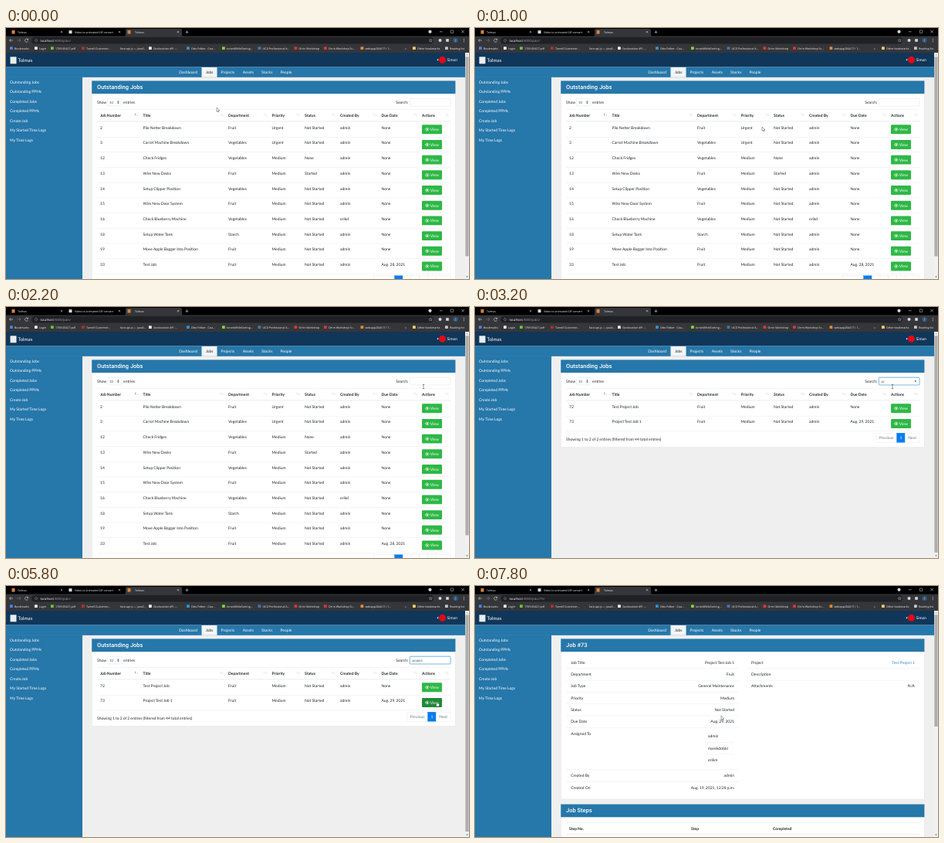
Recreate the animation shown at these times as an HTML page. Size 600 px wide and 325 px high, loop 8000 ms.

```html
<!DOCTYPE html>
<html lang="en">
<head>
<meta charset="utf-8">
<title>Job list</title>
<style>
html, body { margin: 0; width: 100%; height: 100%; overflow: hidden; background: #efefef; }
svg { display: block; width: 600px; height: 325px; text-rendering: geometricPrecision; }
text { font: 5px Lato, sans-serif; fill: #212529; white-space: pre; word-spacing: -.15px; }
.b { font-weight: 700; }
.w { fill: #fff; }
.h { font: 500 7.5px Roboto, sans-serif; fill: #fff; word-spacing: 0; }
.ui { font: 3.6px "Open Sans", sans-serif; fill: #f4f5f6; }
.url { font: 4.2px "Open Sans", sans-serif; fill: #9aa0a6; }
.in { font-size: 4.375px; fill: #495057; }
.m { fill: #6c757d; }
.a { fill: #2f86cc; }
.s { font: 4.4px "DejaVu Sans", sans-serif; fill: #d3d5d7; }
.s.on { fill: #666; }
</style>
</head>
<body>
<svg id="stage" viewBox="0 0 600 325" xmlns="http://www.w3.org/2000/svg"></svg>
<script>
const LOOP = 8000, STEP = 200, MAX_SCROLL = 27;
const BLUE = '#2677aa', LINE = '#dee2e6', ROW = 19.69, TOP = 121.3;

const rect = (x, y, w, h, fill, extra = '') =>
  `<rect x="${x}" y="${y}" width="${w}" height="${h}" fill="${fill}" ${extra}/>`;
const dot = (x, y, r, fill) => `<circle cx="${x}" cy="${y}" r="${r}" fill="${fill}"/>`;
const path = (d, stroke = '#d5d7da', w = .6, fill = 'none') =>
  `<path d="${d}" stroke="${stroke}" stroke-width="${w}" fill="${fill}"/>`;
const rule = (x, y, w, h = .35) => rect(x, y, w, h, LINE);
// y is the middle of the capitals
const text = (x, y, s, cls = '', anchor = 'start') =>
  `<text x="${x}" y="${y + 1.75}" class="${cls}" text-anchor="${anchor}">${s}</text>`;

const COLS = [122, 177.5, 288, 344.5, 387, 433, 486.5, 539, 579.75];
const HEADS = 'Job Number|Title|Department|Priority|Status|Created By|Due Date|Actions'.split('|');
const JOBS = `2|Pilo Netter Breakdown|Fruit|Urgent|Not Started|admin|None
3|Carrot Machine Breakdown|Vegetables|Urgent|Not Started|admin|None
12|Check Fridges|Vegetables|Medium|None|admin|None
13|Wire New Desks|Fruit|Medium|Started|admin|None
14|Setup Clipper Position|Vegetables|Medium|Not Started|admin|None
15|Wire New Door System|Fruit|Medium|Not Started|admin|None
16|Check Blueberry Machine|Vegetables|Medium|Not Started|erikd|None
18|Setup Water Tank|Starch|Medium|Not Started|admin|None
19|Move Apple Bagger Into Position|Fruit|Medium|Not Started|admin|None
33|Test Job|Fruit|Medium|Not Started|admin|Aug. 28, 2021
72|Test Project Job|Fruit|Medium|Not Started|admin|None
73|Project Test Job 1|Fruit|Medium|Not Started|admin|Aug. 29, 2021`
  .split('\n').map(r => r.split('|'));

// time, x, y, kind
const POINTER = [
  [0, 273, 103, 'arrow'], [1000, 372, 128, 'arrow'], [1200, 444.8, 148.5, 'arrow'],
  [1800, 505, 125, 'arrow'], [2200, 541, 103, 'beam'], [4600, 545, 118, 'arrow'],
  [4800, 552, 135, 'arrow'], [5000, 558.5, 150, 'hand'], [6000, 558.5, 150, 'arrow'],
  [6600, 530, 149, 'arrow'], [6800, 465, 148, 'arrow'], [7000, 405, 150, 'arrow'],
  [7200, 355, 153, 'arrow'], [7400, 329, 157, 'arrow'], [7800, 319, 168, 'arrow']];

function pointer(t) {
  const [, x, y, kind] = POINTER.filter(p => p[0] <= t).pop();
  const shape = {
    arrow: path('M0 0V5.3L1.3 4.2L2.1 6L3 5.6L2.2 3.9H3.8Z', '#222', .4, '#fff'),
    beam: path('M-1.2-2.6H1.2M0-2.6V2.6M-1.2 2.6H1.2', '#333', .5),
    hand: path('M-.6 0Q0-.6.5 0V2L3 2.6V4.5L2.3 6H-.2L-1.8 3.4L-.6 3.6Z', '#222', .4, '#fff')
  }[kind];
  return `<g transform="translate(${x} ${y})">${shape}</g>`;
}

function chrome(t) {
  const onJob = t >= 6000, loading = onJob && t < 6600;
  const cross = (x, y, r) => path(`M${x - r} ${y - r}l${2 * r} ${2 * r}m0 ${-2 * r}l${-2 * r} ${2 * r}`);
  let s = rect(0, 0, 600, 11, '#000') + path('M153 11Q155 11 155 8V3Q155 1 157 1H226Q228 1 228 3V8Q228 11 230 11Z', 'none', 0, '#35363a')
    + rect(0, 10.5, 600, 21.5, '#35363a') + rect(33, 11.8, 521, 8.6, '#202124', 'rx="4.3"');
  s += rect(7.5, 3, 4, 4.6, '#d8813a') + rect(81.5, 3.2, 4, 4, '#ddd')
    + (loading ? dot(159.5, 5.3, 2, '#8ab4f8') : rect(157.5, 3, 4, 4.6, '#d8813a'));
  s += text(15, 4.9, 'Tolmas', 'ui') + text(89, 4.9, 'Video to animated GIF convert', 'ui') + text(167, 4.9, 'Tolmas', 'ui');
  for (const x of [72, 147, 223]) s += cross(x, 5.2, 1.1);
  s += path('M232.5 5.3h4M234.5 3.3v4M562 4.8h3.6') + path('M576.4 3h3.4v3.4h-3.4Z', '#d5d7da', .5)
    + cross(592, 4.7, 1.7) + dot(549.5, 4.8, 2.1, '#d5d7da');
  s += path('M9 16H4.5l2-2m-2 2l2 2') + path('M14.5 16H19l-2-2m2 2l-2 2', '#777a7f')
    + path('M28.4 15A2.1 2.1 0 1 0 28.6 17M28.6 13.7V15.4H27') + path('M39 14.4a1.7 1.7 0 1 0 .1 0M39 15.8v1.2', '#aaa', .4);
  s += text(44.5, 16, `<tspan class="w">localhost</tspan>:8000/jobs/${onJob ? '73/' : ''}`, 'url');
  s += path('M550.3 14l.6 1.4 1.5.1-1.1 1 .4 1.5-1.4-.8-1.3.8.3-1.5-1.1-1 1.5-.1Z', '#ccc', .4);
  s += dot(562.5, 16, 2, '#d5d7da') + rect(570.2, 14.2, 3.6, 3.6, '#d5d7da') + dot(582.5, 16, 3, '#315d86')
    + text(582.5, 15.6, 'J', 'ui', 'middle');
  for (const y of [14.3, 16, 17.7]) s += dot(593.3, y, .5, '#ddd');

  const marks = [[11, 'Bookmarks', '#4285f4'], [43, 'Login', '#eee'], [64, '1709.05427.pdf', '#65c83c'],
    [104, 'Tarnell Customer…', '#b42e2e'], [148, 'face-api.js — JavaS…'], [191, 'Geolocation API -…', '#eee'],
    [240, 'Otto Felber - Coa…', '#2897d8'], [286, 'tonesWhileSorting…', '#7ad63c'], [332.5, 'UCD Professional A…', '#3d78b0'],
    [379.5, 'Orrin Workshop', '#d9363b'], [418, 'Orrin Workshop Sc…', '#d9363b'], [465.5, 'webapp204417 / 1…', '#e58a35'],
    [517, '»'], [533, 'Other bookmarks', '#f3cf67'], [575, 'Reading list', '#c6c9cc']];
  for (const [x, label, fill] of marks)
    s += (fill ? rect(x - 6, 24.3, 3.8, 3.8, fill, 'rx=".5"') : '') + text(x, 25.8, label, 'ui');
  return s;
}

function frame() {
  let s = rect(0, 32, 600, 18.5, '#103659') + rect(0, 50.5, 595, 13.3, BLUE) + rect(0, 63.2, 99, 262, BLUE);
  s += rect(5.5, 37.3, 8, 9, '#e8eef2') + `<text x="15.5" y="43.6" class="w" style="font-size:6.25px">Tolmas</text>`;
  s += path('M560.2 39.8v2.8l-1.7-1.4Z', 'none', 0, '#fff') + dot(565.5, 41.3, 4.5, '#e00b16') + text(571.5, 41.3, 'Simon', 'w');
  s += rect(253.5, 51, 20, 12.8, '#f4f6f7');
  'Dashboard Jobs Projects Assets Stocks People'.split(' ').forEach((label, i) =>
    s += text([224.3, 258.7, 278.5, 306.7, 331, 355.5][i], 57, label, i == 1 ? '' : 'w'));
  ['Outstanding Jobs', 'Outstanding PPMs', 'Completed Jobs', 'Completed PPMs', 'Create Job', 'My Started Time Logs', 'My Time Logs']
    .forEach((label, i) => s += text(5, 70.2 + 12.5 * i, label, 'w'));
  return s;
}

function scrollbar(y, end) {
  return rect(595, 32, 5, 293, '#f1f1f1') + rect(595.4, y, 4.2, end - y, '#adadad')
    + path('M596.3 35.5l1.2-1.5 1.2 1.5Z', 'none', 0, y > 38 ? '#505050' : '#a3a3a3')
    + path('M596.3 321.5l1.2 1.5 1.2-1.5Z', 'none', 0, '#505050');
}

const card = (y, bottom, title) => rect(111.2, y, 471.2, bottom - y, '#fff', 'stroke="#dcdcdc" stroke-width=".35"')
  + rect(111.2, y, 471.2, 16.7, BLUE) + text(118, y + 9, title, 'h');

function viewButton(y, hover) {
  return rect(539, y, 26, 11.9, hover ? '#208a38' : '#2eb846', 'rx="1.2"')
    + path(`M543 ${y + 6}q2.8-3.6 5.6 0q-2.8 3.6-5.6 0Z`, '#fff', .6) + dot(545.8, y + 6, .95, '#fff')
    + text(549.7, y + 6.1, 'View', 'w');
}

function pages(y, count) {
  let x = 576 - 18.7 - 10.75 * count - 27, s = '';
  const cell = (w, label, on) => {
    const cls = on ? 'w' : label > 0 || (count > 1 && label == 'Next') ? 'a' : 'm';
    s += rect(x, y, w, 12.1, on ? '#0a7cf0' : '#fff', `stroke="${on ? '#0a7cf0' : LINE}" stroke-width=".35"`)
      + text(x + w / 2, y + 6.1, label, cls, 'middle');
    x += w;
  };
  cell(27, 'Previous');
  for (let i = 1; i <= count; i++) cell(10.75, i, i == 1);
  cell(18.7, 'Next');
  return s;
}

function jobList(t) {
  const typed = 'project'.slice(0, Math.max(0, (t - 2800) / STEP));
  const rows = typed ? JOBS.filter(r => r[1].toLowerCase().includes(typed)) : JOBS.slice(0, 10);
  const end = TOP + ROW * rows.length, focus = t >= 2400;
  let s = card(68.4, end + 20.7, 'Outstanding Jobs');
  s += text(118, 96.1, 'Show') + rect(131.5, 91.3, 18.5, 9.6, '#fff', 'rx="1" stroke="#ced4da" stroke-width=".35"')
    + text(134, 96.2, '10', 'in') + path('M144.2 95.6l1.2-1.7 1.2 1.7ZM144.2 96.6l1.2 1.7 1.2-1.7Z', 'none', 0, '#343a40')
    + text(152, 96.1, 'entries') + text(521.2, 96.1, 'Search:', '', 'end');
  if (focus) s += rect(522.6, 90.6, 54, 11, '#c4e0f5', 'rx="1.4"');
  s += rect(523.4, 91.3, 52.6, 9.6, '#fff', `rx="1" stroke="${focus ? '#4f9bcd' : '#ced4da'}" stroke-width="${focus ? .6 : .35}"`)
    + text(526.5, 96.1, typed, 'in');
  if (typed && t < 4600) s += path('M569.7 95l2.2 2.2m0-2.2l-2.2 2.2', '#34506b', .7);

  s += rule(118, 105.3, 458) + rule(118, 120.6, 458, .65);
  HEADS.forEach((head, i) => {
    const right = COLS[i + 1] - 3.75;
    s += text(COLS[i], 113.3, head, 'b') + text(right - 4, 112.6, '↑', i ? 's' : 's on', 'end')
      + text(right - 1.5, 112.6, '↓', 's', 'end');
  });
  rows.forEach((row, i) => {
    const y = TOP + ROW * i;
    if (i) s += rule(118, y, 458);
    row.forEach((cell, c) => s += text(COLS[c], y + 7.7, cell));
    s += viewButton(y + 4, t >= 5000 && i == 1);
  });
  s += rule(118, end, 458);
  const n = rows.length;
  s += text(118, end + 10.1, typed ? `Showing 1 to ${n} of ${n} entries (filtered from 44 total entries)` : 'Showing 1 to 10 of 44 entries')
    + pages(end + 2.5, typed ? 1 : 5);

  const down = (t >= 200 && t < 800) || (t >= 1400 && t < 1800);
  const scroll = down ? MAX_SCROLL : 0;
  return `<g transform="translate(0 ${-scroll})">${s}</g>` + frame()
    + (typed ? scrollbar(37.3, 318) : scrollbar(37.3 + scroll * .88, 295.5 + scroll * .88));
}

function jobPage() {
  let s = card(68.4, 276, 'Job #73');
  const field = (x, right, y, label, value, cls) => text(x, y, label) + text(right, y, value, cls, 'end');
  [['Job Title', 'Project Test Job 1'], ['Department', 'Fruit'], ['Job Type', 'General Maintenance'], ['Priority', 'Medium'],
    ['Status', 'Not Started'], ['Due Date', 'Aug. 29, 2021'], ['Assigned To', '']].forEach(([label, value], i) => {
    const y = 99.1 + 15.3 * i;
    s += field(124.2, 336, y, label, value) + (i < 6 ? rule(118, y + 7.5, 224) : '');
  });
  ['admin', 'marekdolski', 'erikm'].forEach((name, i) =>
    s += text(302, 194.6 + 15.3 * i, name) + (i < 2 ? rule(295.5, 202.2 + 15.3 * i, 40.5) : ''));
  s += rule(118, 237.8, 224) + field(124.2, 336, 245.6, 'Created By', 'admin') + rule(118, 253.2, 224)
    + field(124.2, 336, 261, 'Created On', 'Aug. 19, 2021, 12:28 p.m.');
  s += field(358, 570, 99.1, 'Project', 'Test Project 1', 'a') + rule(352, 106.6, 224)
    + field(358, 570, 114.4, 'Description', '') + rule(352, 121.9, 224) + field(358, 570, 129.7, 'Attachments', 'N/A');
  s += card(282.6, 330, 'Job Steps') + rule(118, 306.5, 458) + rule(118, 321.4, 458, .65)
    + text(122, 314, 'Step No.', 'b') + text(280, 314, 'Step', 'b') + text(386, 314, 'Completed', 'b');
  return s + frame() + scrollbar(37.3, 182);
}

const stage = document.getElementById('stage'), start = performance.now();
let shown = -1;
function tick() {
  const t = Math.floor((performance.now() - start) % LOOP / STEP) * STEP;
  if (t != shown) {
    shown = t;
    stage.innerHTML = rect(0, 0, 600, 325, '#efefef') + (t < 6000 ? jobList(t) : jobPage()) + chrome(t) + pointer(t);
  }
  requestAnimationFrame(tick);
}
tick();
</script>
</body>
</html>
```
